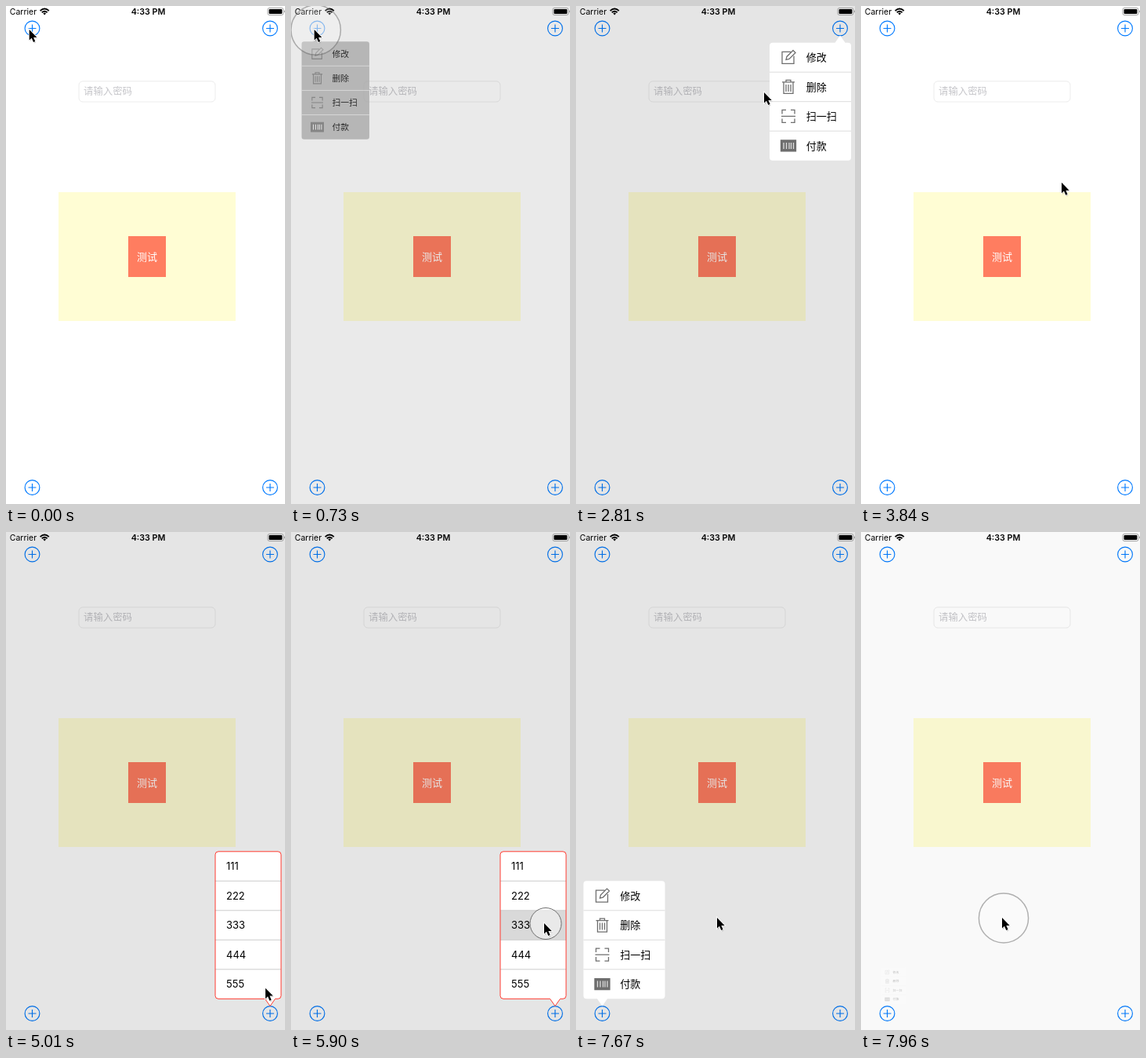
An HTML page that plays this animation: 356 by 634 pixels, repeating every 8 s.

```html
<!DOCTYPE html>
<html lang="zh-CN">
<head>
<meta charset="utf-8">
<style>
html, body { margin: 0; height: 100%; overflow: hidden; background: #fff; }
svg { display: block; width: 100vw; height: 100vh; }
text { font: 13px Inter, "Noto Sans CJK SC", "Noto Sans CJK", sans-serif; }
.icon { fill: none; stroke: #6e6e6e; stroke-width: 1.3; }
</style>
</head>
<body>
<svg viewBox="0 0 356 634">
  <rect x="93" y="95.8" width="174" height="26.2" rx="5" fill="none" stroke="#ececec"/>
  <text x="99" y="112.8" fill="#c6c6ca" style="font-size:12.4px">请输入密码</text>
  <path d="M67 237H293V401H67Z" fill="#fffdd4"/>
  <path d="M156 293H204V345H156Z" fill="#ff7d60"/>
  <text x="180" y="323.8" fill="#fff" text-anchor="middle">测试</text>
  <g id="buttons"></g>
  <rect id="mask" width="356" height="634"/>
  <g id="menus"></g>
  <text x="4.8" y="11" style="font-size:10.5px">Carrier</text>
  <g fill="none" stroke="#000" stroke-width="1.9">
    <path d="M43.6 6.1Q49.2 .9 54.8 6.1M45.8 8.3Q49.2 5.2 52.6 8.3"/>
    <path d="M47.3 9.3Q49.2 7.8 51.1 9.3L49.2 11.4Z" fill="#000" stroke="none"/>
  </g>
  <text x="181.5" y="11" text-anchor="middle" style="font-size:10.7px;font-weight:600">4:33 PM</text>
  <rect x="334" y="2.5" width="19.8" height="9" rx="2" fill="none" stroke="#999" stroke-width=".9"/>
  <rect x="335.5" y="4" width="16.8" height="6" rx="1"/>
  <path d="M355 5.3q1.6 1.7 0 3.4z" fill="#777"/>
  <circle id="ring" fill="#fff" fill-opacity=".4" stroke="#6e6e6e"/>
  <g id="cursor">
    <path d="M1 1.5V15L4 12.2 6.3 17.5 8.6 16.5 6.4 11.4H10.7Z" opacity=".2"/>
    <path d="M0 0V13.5L3 10.7 5.3 16 7.6 15 5.4 9.9H9.7Z" stroke="#fff" stroke-width="1.6" paint-order="stroke"/>
  </g>
</svg>
<script>
const LOOP = 8000, STEP = 147.3, FIRST = 432, ROW = 37.5, ARROW = 9.2;
const $ = id => document.getElementById(id);
const clamp = v => Math.max(0, Math.min(1, v));
const smooth = v => (v = clamp(v), v * v * (3 - 2 * v));

const spots = [[33.5, 28.5], [337, 28.5], [337, 613], [33.5, 613]];
$("buttons").innerHTML = spots.map(([x, y]) =>
  `<path transform="translate(${x} ${y})" d="M-9.4 0a9.4 9.4 0 1 0 18.8 0a9.4 9.4 0 1 0-18.8 0M-5 0H5M0-5V5"
    fill="none" stroke="#007aff" stroke-width="1.15"/>`).join("");

// 18px icons, centred on 0,0: edit, bin, scan, barcode
const icons = [
  '<path d="M3-7H-8V8H7V-2M-3 3L-2-1 6-9 9-6 1 2Z"/>',
  '<path d="M-8-6H8M-3-6V-8.5H3V-6M-6-6V8.5H6V-6M-3-3V6M0-3V6M3-3V6"/>',
  '<path d="M-8-3V-8H-3M3-8H8V-3M-8 3V8H-3M3 8H8V3M-9 0H9"/>',
  '<path d="M-9.5-7H9.5V7H-9.5Z" fill="#6e6e6e"/><path d="M-6-4V4M-2.5-4V4M1-4V4M3.5-4V4M6.5-4V4" stroke="#ddd"/>'
];
const actions = ["修改", "删除", "扫一扫", "付款"];
const numbers = ["111", "222", "333", "444", "555"];

// left/right are relative to the arrow tip; dir is 1 below the button, -1 above
const menus = [
  { tip: [33.5, 37.5], dir: 1, left: -24, right: 80, items: actions, fill: "#aaa", open: 554, close: 1424 },
  { tip: [337, 37.5], dir: 1, left: -90, right: 14, items: actions, fill: "#fff", open: 2340, close: 2950 },
  { tip: [337, 603.5], dir: -1, left: -70, right: 14, items: numbers, fill: "#fff", edge: "#ff3b30", open: 4550, close: 6040 },
  { tip: [33.5, 603.5], dir: -1, left: -24, right: 80, items: actions, fill: "#fff", open: 7050, close: 7780 }
];

function menuMarkup({ dir, left: l, right: r, items, fill, edge }) {
  const h = items.length * ROW, a = ARROW * dir, b = (ARROW + h) * dir, c = 4 * dir;
  const top = Math.min(a, b), plain = items === numbers;
  const shape = `M0 0L6.5 ${a}H${r - 4}Q${r} ${a} ${r} ${a + c}V${b - c}Q${r} ${b} ${r - 4} ${b}` +
    `H${l + 4}Q${l} ${b} ${l} ${b - c}V${a + c}Q${l} ${a} ${l + 4} ${a}H-6.5Z`;
  const rows = items.map((label, i) => {
    const y = top + i * ROW, mid = y + ROW / 2;
    return (plain && i === 2 ? `<rect id="picked" x="${l}" y="${y}" width="${r - l}" height="${ROW}" fill="#d9d9d9"/>` : "") +
      (i ? `<path d="M${l} ${y}H${r}" stroke="${plain ? "#ccc" : "#dcdcdc"}"/>` : "") +
      (plain ? "" : `<g class="icon" transform="translate(${l + 24} ${mid})">${icons[i]}</g>`) +
      `<text x="${l + (plain ? 14 : 46.8)}" y="${mid + 4.7}">${label}</text>`;
  }).join("");
  return `<g><path d="${shape}" fill="${fill}"/>${rows}<path d="${shape}" fill="none" stroke="${edge || "none"}"/></g>`;
}
$("menus").innerHTML = menus.map(menuMarkup).join("");

// press, release, button index
const taps = [
  [440, 590, 0], [1300, 1425], [2200, 2360, 1], [2800, 2955],
  [4410, 4565, 2], [5740, 6040], [6900, 7055, 3], [7660, 7810]
];
// time, x, y of the pointer tip
const path = [
  [0, 29.7, 30], [880, 29.7, 30], [1320, 45, 98], [1620, 45, 98], [2200, 333, 29], [2400, 333, 29],
  [2800, 240, 110], [3400, 240, 110], [3840, 256, 225], [4130, 334, 611], [4700, 334, 611],
  [5600, 323, 498], [6050, 323, 498], [6770, 31, 607], [7150, 31, 607], [7640, 180, 491], [LOOP, 180, 491]
];

function pointer(t) {
  const i = path.findIndex(p => p[0] > t);
  const [t0, x0, y0] = path[i - 1], [t1, x1, y1] = path[i];
  const u = smooth((t - t0) / (t1 - t0));
  return [x0 + (x1 - x0) * u, y0 + (y1 - y0) * u];
}

function draw(now) {
  const n = Math.floor((now % LOOP - FIRST) / STEP);
  const t = n < 0 ? 0 : 440 + n * STEP;

  const [x, y] = pointer(t);
  $("cursor").setAttribute("transform", `translate(${x} ${y})`);

  let dim = 0;
  menus.forEach((m, i) => {
    const p = t < m.close ? smooth((t - m.open) / 250) : 1 - smooth((t - m.close) / 250);
    const g = $("menus").children[i];
    g.setAttribute("transform", `translate(${m.tip}) scale(${0.1 + 0.9 * p})`);
    g.setAttribute("opacity", p);
    dim = Math.max(dim, p);
  });
  $("mask").setAttribute("opacity", dim * 0.1);
  $("picked").setAttribute("opacity", t > 5880 ? 1 : 0);

  const ring = $("ring");
  ring.setAttribute("opacity", 0);
  for (const [press, release, button] of taps) {
    const u = clamp((t - release) / 300);
    if (button !== undefined)
      $("buttons").children[button].setAttribute("opacity", t < press ? 1 : 0.15 + 0.85 * u);
    if (t < press || u >= 1) continue;
    ring.setAttribute("cx", x + 2);
    ring.setAttribute("cy", y + 0.5);
    ring.setAttribute("r", 20 + 16 * (1 - (1 - u) ** 2));
    ring.setAttribute("stroke-width", 1 + u);
    ring.setAttribute("opacity", 1 - u);
  }
  requestAnimationFrame(tick);
}
const start = performance.now();
function tick() { draw(performance.now() - start); }
tick();
</script>
</body>
</html>
```
